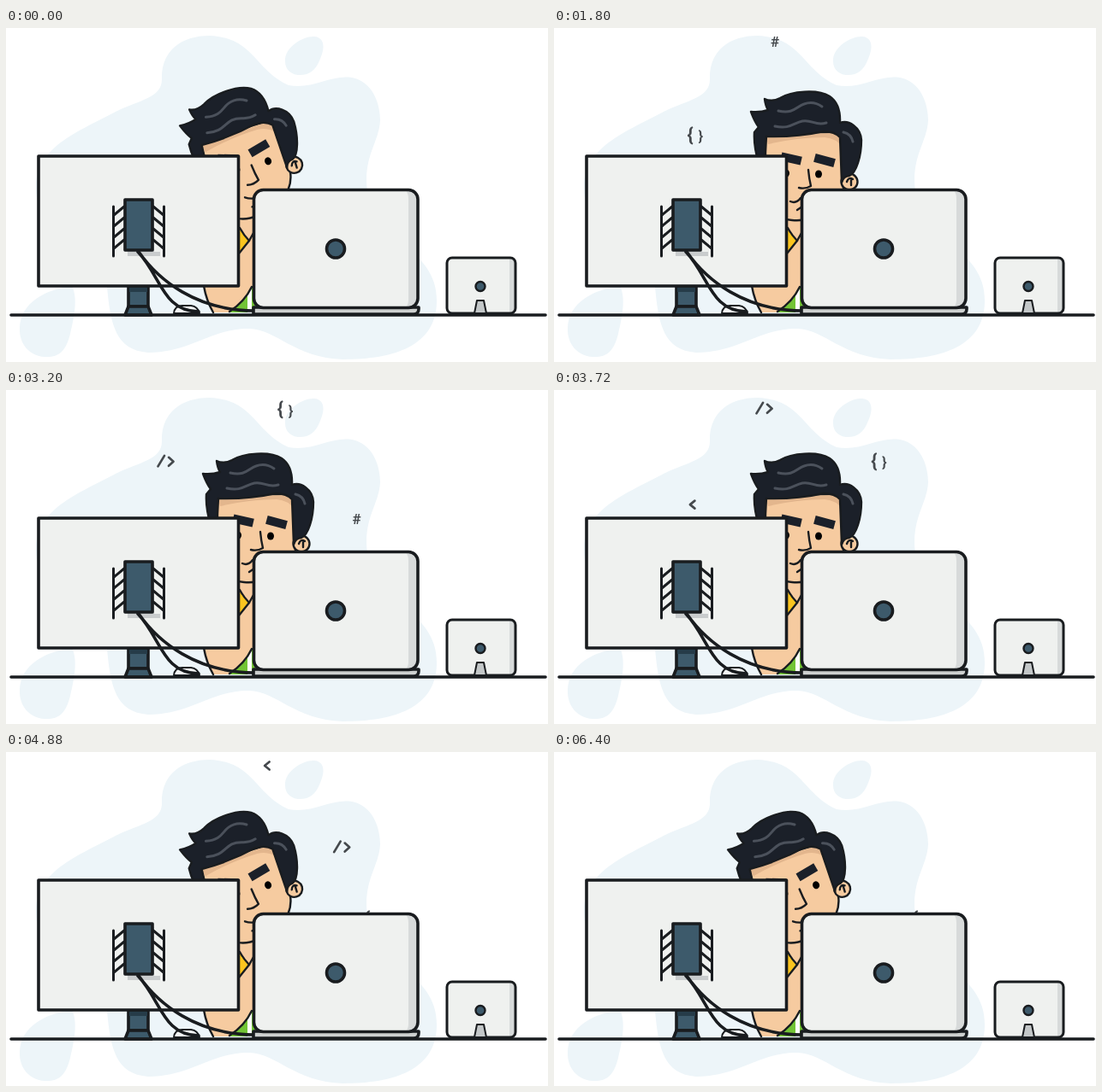
An HTML page that plays this animation: 633x391 px, repeating every 6640 ms.

```html
<!DOCTYPE html>
<html lang="en">
<head>
<meta charset="utf-8">
<title>Coder at the desk</title>
<style>
html, body { margin: 0; width: 100%; height: 100%; overflow: hidden; background: #fff; }
svg { display: block; width: 633px; height: 391px; }
.ink { stroke: #191c1f; stroke-width: 3.6; stroke-linejoin: round; stroke-linecap: round; }
.thin { stroke-width: 2.4; }
.line { fill: none; }
.blob { fill: #edf5f9; }
.case { fill: #eff1ef; }
.blue { fill: #3d5a6b; }
.shade { fill: #d7dada; }
.skin { fill: #f6cba0; }
.hair { fill: #1b2029; }
.shine { fill: none; stroke: #4b515b; stroke-width: 3; stroke-linecap: round; }
.code { fill: #45494d; font: bold 17px Roboto, "Liberation Sans", sans-serif; text-anchor: middle; }
.code path { fill: none; stroke: #45494d; stroke-width: 2.7; stroke-linecap: round; stroke-linejoin: round; }
</style>
</head>
<body>
<svg viewBox="0 0 633 391">
  <g class="blob">
    <path d="M182 60C181 28 203 9 238 9C289 11 291 50 330 67C359 73 382 52 408 59C430 66 437 91 437 108C436 131 421 146 421 178C421 246 503 255 503 318C504 372 454 388 394 388C336 386 317 353 284 352C241 351 216 380 166 380C128 377 122 347 118 303C100 268 34 250 35 184C37 137 88 120 128 98C156 84 182 82 182 60Z"/>
    <path d="M77 302C84 316 80 337 75 358C70 379 61 386 45 385C27 384 15 369 16 351C17 321 47 306 77 302Z"/>
    <path d="M326 39C325 22 348 9 360 10C372 11 373 23 367 36C362 50 353 56 341 55C332 54 326 48 326 39Z"/>
  </g>

  <g class="code">
    <g><text y="6">#</text></g>
    <g><text x="-5" y="5" font-size="22" style="font-size:22px">{</text><text x="7" y="4.5">}</text></g>
    <g><path d="M-9 6L-1.500-6.500M3.500-4.500L9 .5L3.500 5.500"/></g>
    <g><path d="M3-4.500L-2.500 0L3 4.500"/></g>
  </g>

  <!-- arm and shirt -->
  <path class="skin" d="M262 205H290V333H243Q234 320 231 300L262 280Z"/>
  <path class="ink thin line" d="M231 302Q234 319 242 333"/>
  <path class="ink thin" fill="#fcc51f" d="M266 230L273 234Q278 243 284 249L272 264L266 270Z"/>
  <path class="ink thin line" d="M284 249L289 240"/>
  <path fill="#72c435" d="M261 333L277 318L287 302H291V333Z"/>
  <path fill="#fff" d="M282 310L287 302V333H282Z"/>
  <path class="ink thin line" d="M287 303Q279 320 261 332"/>

  <g id="head">
    <path class="skin ink thin" d="M247 122H338V188C334 211 309 227 278 225C258 224 247 208 247 190Z"/>
    <path fill="#e3b68d" d="M247 126Q290 126 337 122V140Q330 129 316 128Q285 128 250 136Z"/>
    <circle class="skin ink thin" cx="345" cy="180" r="9.500"/>
    <path class="ink thin line" d="M342 180Q344 174 349 177M347 178V184"/>
    <path class="hair ink thin" d="M239 158Q233 138 234 122L239 116Q234 109 230 98Q241 99 250 96Q247 91 246 83Q254 87 264 82C277 74 308 71 322 80Q335 89 334 111C344 107 358 116 359 131C359 150 353 170 345 173Q338 173 336 181L334 128Q328 121 315 121Q283 128 248 127L246 158Z"/>
    <path class="shine" d="M262 97C280 101 283 92 292 89Q303 85 313 92M258 115C275 119 280 111 290 109C302 107 305 115 318 111M338 122Q347 124 349 133"/>
    <path class="ink thin line" d="M297 166Q298 177 300 185Q293 189 286 187"/>
    <path class="ink thin line" id="mouth"/>
    <g id="eyes"><ellipse cx="309" cy="171" rx="4" ry="4.500"/><ellipse cx="271" cy="170" rx="4" ry="4.500"/></g>
    <rect class="hair" id="brow" x="-12" y="-5" width="24" height="10"/>
    <rect class="hair" id="farBrow" x="-12" y="-5" width="24" height="10"/>
  </g>

  <!-- mouse -->
  <path class="ink" style="stroke-width:2" fill="#f4f6f6" d="M196 334Q197 325 206 325H216Q224 326 226 334Z"/>

  <!-- monitor -->
  <path class="ink blue" d="M143 302H166V326H143Z"/>
  <path fill="#263c49" d="M144 304H165V309H144Z"/>
  <path class="ink blue" d="M143 326H166L170 336H139Z"/>
  <path class="ink case" d="M38 150H271.500V302H38Z"/>
  <path fill="#c9cccd" d="M142 205H180V267H142Z"/>
  <path class="case" d="M173 203H183V262H173Z"/>
  <g class="ink line" style="stroke-width:3">
    <path d="M125.500 209V267M184.500 209V267"/>
    <path id="ribs"/>
  </g>
  <path class="ink blue" d="M139 201H171V260H139Z"/>
  <path class="ink line" d="M154 262C181 290 183 332 225 332M155 262C178 295 222 331 291 331"/>

  <!-- laptop -->
  <path class="ink" fill="#cdd0cf" d="M289 327H482V329Q482 335 476 335H289Z"/>
  <rect class="case" x="289.500" y="189.500" width="191.500" height="138" rx="11"/>
  <path class="shade" d="M467 190Q470 194 470 200V318Q470 324 467 327H472Q481 325 481 317V200Q481 191 472 190Z"/>
  <rect class="ink line" x="289.500" y="189.500" width="191.500" height="138" rx="11"/>
  <circle class="ink blue" cx="385" cy="258.500" r="10.500"/>

  <!-- tablet -->
  <rect class="case" x="515" y="269" width="80" height="65" rx="6"/>
  <path class="shade" d="M588 270H590Q595 270 595 276V328Q595 334 588 334Z"/>
  <rect class="ink line" style="stroke-width:3" x="515" y="269" width="80" height="65" rx="6"/>
  <circle class="ink blue thin" cx="554" cy="302.500" r="5.500"/>
  <path class="ink" style="stroke-width:2" fill="#c3c7c8" d="M547 334L550 319H558L561 334Z"/>

  <path class="ink" d="M6 336H630"/>
</svg>
<script>
const LOOP = 6640;
const $ = id => document.getElementById(id);
const glyphs = document.querySelectorAll(".code > g");

// time at the top of the arc, speed in px per ms
const flights = [[1953, .16], [2910, .157], [3947, .167], [4751, .176]];
const arc = document.createElementNS("http://www.w3.org/2000/svg", "path");
arc.setAttribute("d", "M137 198C177 83 217 13 282 13C347 13 387 83 427 198");
const half = arc.getTotalLength() / 2;

let ribs = "";
for (let y = 209; y < 255; y += 13) ribs += `M138 ${y}L126 ${y + 10}M172 ${y}L184 ${y + 10}`;
$("ribs").setAttribute("d", ribs);

const mix = (a, b, p) => a + (b - a) * p;
const ease = (t, from, to) => {
  const p = Math.min(1, Math.max(0, (t - from) / (to - from)));
  return p * p * (3 - 2 * p);
};
const place = (el, x, y, turn = 0) =>
  el.setAttribute("transform", `translate(${x} ${y}) rotate(${turn})`);

function draw(t) {
  flights.forEach(([top, speed], i) => {
    const p = arc.getPointAtLength(half + (t - top) * speed);
    place(glyphs[i], p.x, p.y);
  });

  const up = ease(t, 1300, 1620) - ease(t, 4420, 4740);
  $("head").setAttribute("transform", `rotate(${mix(-16.5, 0, up)} 273 199)`);
  place($("eyes"), mix(8, 0, up), mix(-4, 0, up));
  place($("brow"), mix(311, 316, up), mix(149.5, 155, up), mix(-14, 15, up));
  place($("farBrow"), mix(273, 277, up), mix(151, 153, up), mix(18, 13, up));
  $("mouth").setAttribute("d",
    `M${mix(279, 276, up)} ${mix(200, 203, up)}Q283 ${mix(203, 206, up)} 288 ${mix(204, 199, up)}` +
    `M284 213L${mix(284, 290, up)} ${mix(213, 209, up)}`);
}

const start = performance.now();
(function tick() {
  draw((performance.now() - start) % LOOP);
  requestAnimationFrame(tick);
})();
</script>
</body>
</html>
```
